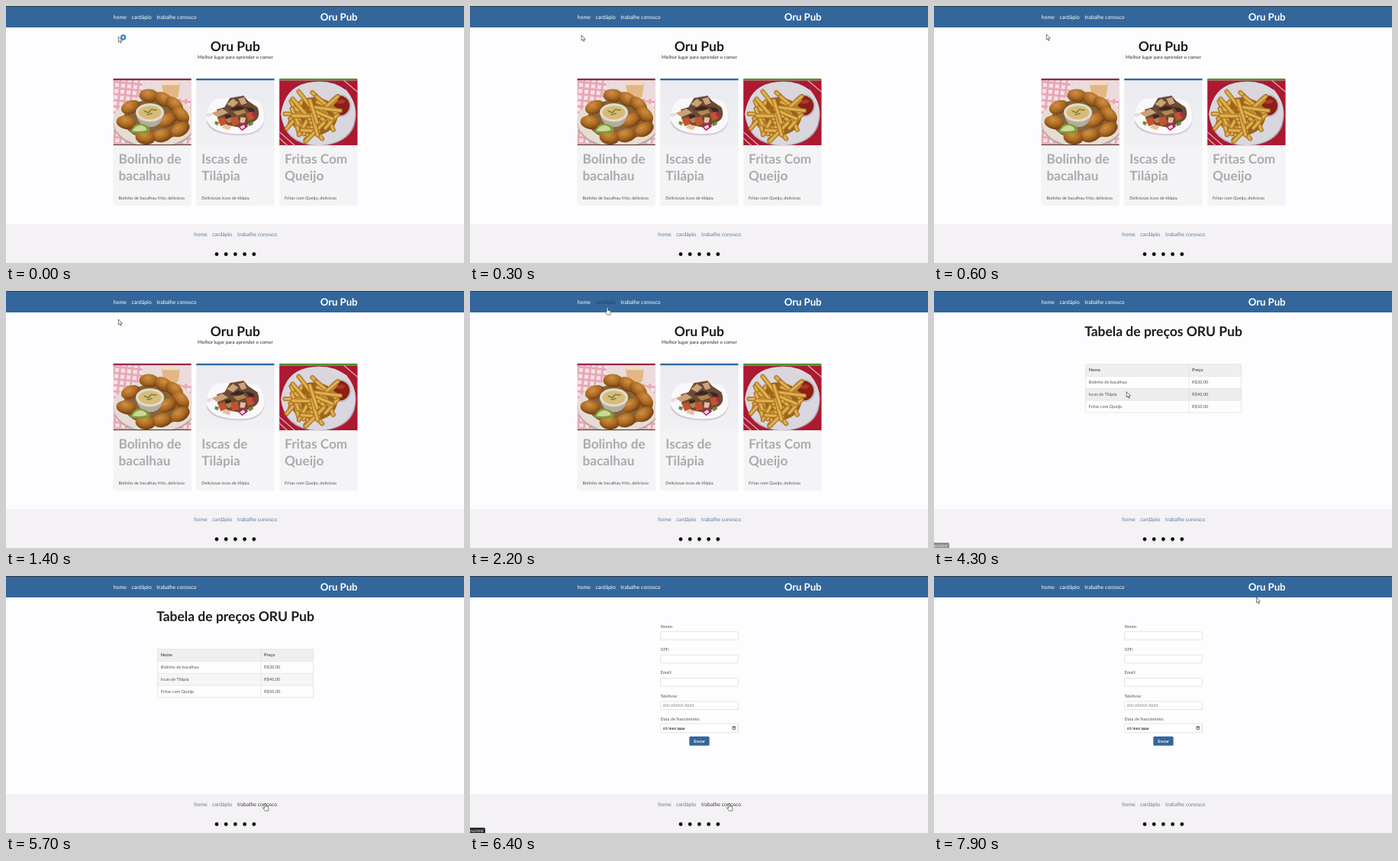
Animation of 600x336 px, one loop 8000 ms. Source, as an HTML page:

```html
<!DOCTYPE html>
<html lang="pt">
<head>
<meta charset="utf-8">
<title>Oru Pub</title>
<style>
html, body { margin: 0; width: 100%; height: 100%; overflow: hidden; background: #fdfcfe; }
svg { display: block; font-family: Lato, "Open Sans", sans-serif; text-rendering: geometricPrecision; }
#stage { width: 100%; height: 100%; }
.nav { font-size: 7px; }
.top { fill: #fff; }
.foot { fill: #587da3; }
.bold { font-weight: 700; }
.h1 { font-size: 17.5px; font-weight: 700; fill: #1c1c1e; text-anchor: middle; }
.dish { font-size: 17.2px; font-weight: 700; fill: #acabac; }
.small { font-size: 5.65px; fill: #565656; }
.box { fill: #fff; stroke: #c9c8c9; stroke-width: .5; }
.line { fill: none; stroke: #dcdbdc; stroke-width: .6; }
.ink { stroke: #222; stroke-width: .6; stroke-linejoin: round; fill: #fff; }
</style>
</head>
<body>
<svg id="stage" viewBox="0 0 600 336">
  <defs>
    <pattern id="cloth" width="8" height="8" patternUnits="userSpaceOnUse" patternTransform="rotate(6)">
      <path fill="#f4e4e9" d="M0 0h8v8H0z"/>
      <path fill="#dc6a80" opacity=".5" d="M0 0h3v8H0zM0 0h8v3H0z"/>
    </pattern>
    <linearGradient id="table" x2="0" y2="1">
      <stop stop-color="#ebeaee"/><stop offset="1" stop-color="#f1f0f3"/>
    </linearGradient>
    <radialGradient id="crust" cx=".42" cy=".3" r=".65">
      <stop stop-color="#cf9043"/><stop offset=".6" stop-color="#ab6a23"/><stop offset="1" stop-color="#7a4414"/>
    </radialGradient>
  </defs>

  <path fill="#fdfcfe" d="M0 0h600v336H0z"/>
  <path fill="#33679b" d="M0 0h600v28H0z"/>
  <path fill="#2d2b30" d="M0 0h600v.7H0z"/>
  <g class="nav top">
    <text x="140.7" y="17">home</text>
    <text id="menuLink" x="164.5" y="17">cardápio</text>
    <text x="197.2" y="17">trabalhe conosco</text>
  </g>
  <text class="top bold" x="460.5" y="19" font-size="13.1" text-anchor="end">Oru Pub</text>

  <path fill="#f4f2f5" d="M0 285h600v51H0z"/>
  <g class="nav foot">
    <text x="246.3" y="300.6">home</text>
    <text x="270" y="300.6">cardápio</text>
    <text id="jobsLink" x="302.9" y="300.6">trabalhe conosco</text>
  </g>
  <g fill="#111">
    <circle cx="276" cy="324.5" r="2.4"/><circle cx="288.2" cy="324.5" r="2.4"/>
    <circle cx="300.4" cy="324.5" r="2.4"/><circle cx="312.6" cy="324.5" r="2.4"/>
    <circle cx="324.8" cy="324.5" r="2.4"/>
  </g>

  <g id="home">
    <text class="h1" x="300.3" y="59">Oru Pub</text>
    <text x="300.5" y="69.4" font-size="6.3" fill="#333" text-anchor="middle">Melhor lugar para aprender e comer</text>
    <g id="cards"></g>

    <svg x="140.5" y="97.3" width="102.2" height="84.9">
      <path fill="url(#cloth)" d="M0 0h103v85H0z"/>
      <path fill="#eadbdc" d="M38 0h65v24H38z"/>
      <path fill="#e3b784" d="M63 0h25l-3 22H66z"/>
      <path fill="#f0dcc2" d="M63 0h25l-1 6H64z"/>
      <ellipse cx="54" cy="56" rx="54" ry="34" fill="#bdaaa2"/>
      <ellipse cx="54" cy="53" rx="54" ry="34" fill="#e6dcd6"/>
      <ellipse cx="56" cy="51" rx="43" ry="27" fill="#8c6238"/>
      <g id="croquettes" fill="url(#crust)"></g>
      <path fill="#b3ada0" d="M30 43q3 18 18 18t18-18z"/>
      <ellipse cx="48" cy="42" rx="18.5" ry="12" fill="#dfdcd0"/>
      <ellipse cx="48" cy="42" rx="15" ry="9" fill="#d8bb76"/>
      <path d="M40 40l6 2 4-4 7 1M44 45l7-2" fill="none" stroke="#76823a" stroke-width="1.6"/>
      <path fill="#7f9a35" d="M22 68q5-14 16-11 11 2 10 10-8 5-26 1z"/>
      <path fill="#cdd69a" d="M25 66q5-9 13-7 6 2 6 6-8 3-19 1z"/>
      <path fill="#5b3a38" d="M0 83.8h103V85H0z"/>
    </svg>

    <svg x="249.3" y="97.3" width="102.2" height="84.9">
      <path fill="url(#table)" d="M0 0h103v85H0z"/>
      <path fill="#cfcdd3" d="M14 56q0-29 14-31 26-4 52 2 11 6 9 27-4 19-34 18-36-1-41-16z"/>
      <path fill="#f9f8fa" d="M13 49q3-24 16-25 26-4 50 2 11 5 10 26-5 19-35 18-36-1-41-21z"/>
      <path fill="#6b4a36" d="M27 38l10-3 7-12 18-3 6 7 12 8q5 12-3 18l-17 9-18-3-14-9z"/>
      <path fill="#c9a377" d="M20 43l14-6 8 5-14 6zM40 31l8-7 7 5-7 6zM55 24l8-2 3 8-7 2z"/>
      <path fill="#3b2820" d="M43 38l12-5 9 2-6 5zM64 34l11 3 3 9-7-3zM37 45l8 0 1 4-7 1z"/>
      <path fill="#b58354" d="M48 41l14-3 4 4-12 4zM38 51l8-3 3 5-7 3z"/>
      <path fill="#c4532f" d="M28 50l9-2 3 9-8 3zM45 49l9-2 2 10-9 3zM65 43l8-2 3 9-8 3z"/>
      <path fill="#e6bd9d" d="M36 58l10 1-3 6-9-3zM58 48l7 1-2 7-6-1z"/>
      <path fill="#a82852" d="M54 60l8-5 6 5-8 6zM74 41l5 1-1 6-5-2z"/>
      <path fill="#ead9e0" d="M57 61l5-3 2 3-4 3zM12 45l7-3 2 4-6 2z"/>
      <path fill="#6d8a3a" d="M25 53l5 2-2 4-4-2zM68 56l7-3-1 5-5 2z"/>
    </svg>

    <svg x="358.1" y="97.3" width="102.4" height="84.9">
      <path fill="#ad1930" d="M0 0h103v85H0z"/>
      <path d="M-4 64l30 26M-4 72l20 18M80-4l28 24" stroke="#d7a4ae" stroke-width="1.4"/>
      <path fill="#a8a3ae" d="M4 48Q6 12 36 4t52 10q18 20 10 46-9 24-48 26-44-3-46-38z"/>
      <path fill="#d9d6dd" d="M2 44Q7 9 37 3t51 10q17 20 9 45-9 25-47 27-44-4-48-41z"/>
      <circle cx="79" cy="33" r="15" fill="#c2b6ba"/>
      <circle cx="79" cy="33" r="13" fill="#8b2018"/>
      <path fill="#a83a24" d="M73 29q7-7 14-2-5 6-14 2z"/>
      <ellipse cx="45" cy="47" rx="31" ry="25" fill="#9c651a"/>
      <g id="fries" stroke-linecap="round"></g>
    </svg>
  </g>

  <g id="prices">
    <text class="h1" x="300.5" y="59">Tabela de preços ORU Pub</text>
    <path fill="#f0efef" d="M198.5 95.7h204v15.9h-204z"/>
    <g id="rows"></g>
    <path class="line" d="M198.5 95.7h204v63.2h-204zM334 95.7v63.2M198.5 111.6h204M198.5 127.3h204M198.5 143.1h204"/>
    <g class="small bold"><text x="202.8" y="105.4">Nome</text><text x="338" y="105.4">Preço</text></g>
  </g>

  <g id="form">
    <g id="fields"></g>
    <text x="252.6" y="171.3" font-size="5" fill="#777">(XX) XXXXX-XXXX</text>
    <text x="252.6" y="200.6" font-size="5" fill="#222">dd/<tspan class="bold">mm</tspan>/<tspan class="bold">aaaa</tspan></text>
    <path d="M344 197h3.4v3.4H344zM344 197.3h3.4" fill="none" stroke="#222" stroke-width=".7"/>
    <rect x="287.3" y="209.8" width="26.3" height="12" rx="1.6" fill="#33679b"/>
    <text class="top bold" x="300.5" y="217.6" font-size="5.2" text-anchor="middle">Enviar</text>
  </g>

  <g id="status">
    <path fill="#2b2a2c" d="M0 329h18.5q1.5 0 1.5 1.5V336H0z"/>
    <text x="17.5" y="335.4" font-size="5.2" fill="#eee" text-anchor="end"></text>
  </g>

  <g id="cursor">
    <path id="arrow" class="ink" d="M0 0V7.2L1.7 5.7 2.8 8.4 4 7.9 2.9 5.3H5z"/>
    <path id="hand" class="ink" d="M-.9.9a.9.9 0 0 1 1.8 0V4l2.6.5q.9.3.8 1.4L3.6 9.8H-.3L-2.9 6.6q-.5-1.3.7-1.1l1.3.8z"/>
    <circle id="busy" cx="6.3" cy="1" r="2.7" fill="#cfe4f5" stroke="#3a82c4" stroke-width="1.9"/>
  </g>
</svg>
<script>
const $ = id => document.getElementById(id);
const fill = (id, list, draw) => $(id).innerHTML = list.map(draw).join("");

const dishes = [
  ["#8c2a50", "Bolinho de", "bacalhau", "Bolinho de bacalhau frito, delicioso"],
  ["#3166a0", "Iscas de", "Tilápia", "Deliciosas iscas de tilápia."],
  ["#4c9432", "Fritas Com", "Queijo", "Fritas com Queijo, delicioso"]
];
fill("cards", dishes, ([color, a, b, note], i) => {
  const x = 140.5 + i * 108.8;
  return `<rect x="${x}" y="95" width="102.2" height="166" fill="#f4f3f5"/>
    <rect x="${x}" y="94.8" width="102.2" height="2.6" fill="${color}"/>
    <text class="dish" x="${x + 7}" y="206.2">${a}</text>
    <text class="dish" x="${x + 7}" y="228.3">${b}</text>
    <text class="small" x="${x + 7}" y="252.7">${note}</text>`;
});

const croquettes = [[47, 20, 5], [66, 25, 30], [23, 35, -20], [17, 55, 10], [80, 32, 40],
  [88, 45, 40], [71, 52, -25], [88, 64, -30], [64, 72, -10], [42, 75, 8]];
fill("croquettes", croquettes, ([x, y, a]) =>
  `<ellipse rx="13" ry="8.8" transform="translate(${x} ${y}) rotate(${a})"/>`);

// loose pile of fries from a seeded generator
let seed = 7;
const random = () => (seed = seed * 16807 % 2147483647) / 2147483647;
fill("fries", Array(34).fill(0), () => {
  const r = 27 * Math.sqrt(random()), a = 6.28 * random();
  const tilt = 360 * random(), size = 9 + 9 * random();
  const stick = (color, width) => `<path d="M${-size} 0H${size}" stroke="${color}" stroke-width="${width}"/>`;
  return `<g transform="translate(${44 + r * Math.cos(a)} ${46 + r * .85 * Math.sin(a)}) rotate(${tilt})">
    ${stick("#93601a", 6)}${stick("#c99232", 4.8)}${stick("#e0b355", 2.4)}</g>`;
});

const prices = [["Bolinho de bacalhau", "R$30,00"], ["Iscas de Tilápia", "R$40,00"], ["Fritas com Queijo", "R$50,00"]];
fill("rows", prices, ([name, price], i) => {
  const y = 111.6 + i * 15.8;
  return `<rect x="198.5" y="${y}" width="204" height="15.8"/>
    <text class="small" x="202.8" y="${y + 9.8}">${name}</text>
    <text class="small" x="338" y="${y + 9.8}">${price}</text>`;
});
const rows = $("rows").querySelectorAll("rect");

fill("fields", ["Nome:", "CPF:", "Email:", "Telefone:", "Data de Nascimento:"], (label, i) => {
  const y = 67.6 + i * 30.4, last = i == 4;
  return `<text class="small" x="249.5" y="${y}">${label}</text>
    <rect class="box" x="249.6" y="${y + (last ? 3.8 : 5.2)}" width="101.8" height="${last ? 11.7 : 10.6}" rx="1.3"/>`;
});

// pointer path: time, x, y
const path = [[0, 147.3, 40], [300, 146, 38], [600, 147.3, 37], [1700, 147.3, 37], [2200, 180, 21.3],
  [2600, 181, 17.3], [3700, 181, 17.3], [4000, 212, 72], [4300, 252.3, 131.8], [4600, 270, 184],
  [4800, 316.5, 268.5], [5000, 316.5, 268.5], [5700, 339.8, 297.2], [7200, 339.8, 297.2], [7900, 422.4, 27.8]];

function pointer(t) {
  const i = path.findIndex(k => k[0] > t);
  if (i < 0) return path.at(-1).slice(1);
  const [a, b] = [path[i - 1], path[i]];
  const p = (t - a[0]) / (b[0] - a[0]);
  return [a[1] + (b[1] - a[1]) * p, a[2] + (b[2] - a[2]) * p];
}

const show = (id, on) => $(id).style.display = on ? "" : "none";
const within = (t, a, b) => t >= a && t < b;
const clamp = v => Math.max(0, Math.min(1, v));

function draw(now) {
  const t = Math.floor(now % 8000 / 100) * 100;
  const [x, y] = pointer(t);
  const onMenu = within(t, 2100, 3800), onJobs = within(t, 5500, 7300);

  show("home", t < 2800);
  show("prices", within(t, 2800, 6100));
  show("form", t >= 6100);

  $("cursor").setAttribute("transform", `translate(${x} ${y})`);
  show("hand", onMenu || onJobs);
  show("arrow", !onMenu && !onJobs);
  show("busy", t < 300);
  $("menuLink").style.fill = onMenu ? "#25405a" : "";
  $("jobsLink").style.fill = onJobs ? "#3c3c3e" : "";

  const over = x > 198 && x < 402 ? Math.floor((y - 111.6) / 15.8) : -1;
  rows.forEach((r, i) => r.setAttribute("fill",
    i % 2 ? (i == over ? "#eeecec" : "#f6f5f5") : (i == over ? "#f8f7f7" : "#fefdfe")));

  const first = t < 5000;
  $("status").style.opacity = first
    ? (t < 2500 ? 0 : clamp(1 - (t - 4000) / 600))
    : (t < 5900 ? 0 : clamp(1 - (t - 7400) / 400));
  $("status").lastElementChild.textContent = first ? "tabela.html" : "formulario.html";
  requestAnimationFrame(() => draw(performance.now()));
}
draw(0);
</script>
</body>
</html>
```
